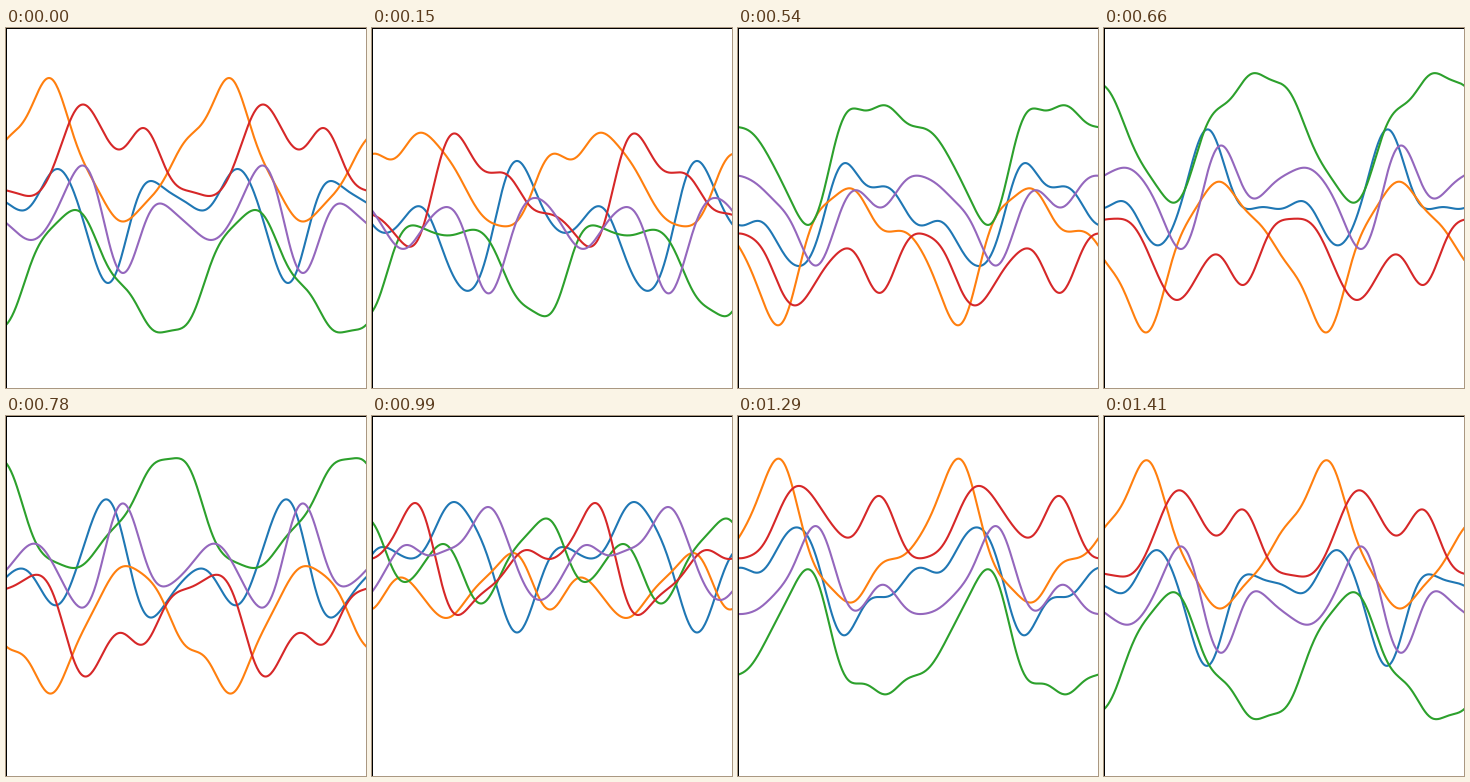
A matplotlib script for the animation above (1440 ms loop, 360 by 360 pixels).

```python
import numpy as np
import matplotlib.pyplot as plt
from matplotlib.animation import FuncAnimation

SIZE = 360
STEPS = 48
INTERVAL = 30
PERIOD = 180
MID = 172.5
ORDER = 8
TURN = 2 * np.pi * 33 / STEPS  # angle between the two key curves of a wave


def basis(x):
    """Fourier basis of one period, damped for smoothness, and its slope."""
    u = 2 * np.pi * np.asarray(x, float)[:, None] / PERIOD
    m = np.arange(1, ORDER + 1)
    damp = np.exp(-(0.62 * m) ** 2 / 4)
    c, s = damp * np.cos(m * u), damp * np.sin(m * u)
    return np.hstack([u ** 0, c, s]), np.hstack([0 * u, -m * s, m * c])


xs = np.linspace(0, SIZE, SIZE + 1)
grid = basis(xs)[0]


def curve(turns, via=()):
    """Smooth periodic curve that is level at the turns and passes the via points."""
    x, y = np.array([*turns, *via], float).T
    values, slopes = basis(x)
    flat = slopes[:len(turns)]
    # Least squares: heights within 0.5, slopes within 4, weights of about 60.
    rows = np.vstack([values / 0.5, flat / 4, np.eye(values.shape[1]) / 60])
    goals = np.zeros(len(rows))
    goals[:len(y)] = (y - MID) / 0.5
    return grid @ np.linalg.lstsq(rows, goals, rcond=None)[0]


# Each wave circles through two key curves.
waves = {
    "tab:blue": (
        curve([(16, 182.5), (51.5, 141), (102, 255), (145, 153)], [(168, 167)]),
        curve([(11, 131), (39, 142.5), (82, 86), (145, 216.5)], [(111, 128)])),
    "tab:orange": (
        curve([(43, 50), (117, 193.5)], [(0, 112), (80, 139), (157, 153)]),
        curve([(29, 161.5), (74, 202), (141, 137), (178, 193.5)], [(107, 168)])),
    "tab:green": (
        curve([(69, 182), (154, 304.5)], [(0, 297), (36, 212), (108, 248)]),
        curve([(33, 166), (71, 128), (109, 187.5), (174, 102.5)], [(145, 130)])),
    "tab:red": (
        curve([(23, 168), (77, 76.5), (113, 121.5), (137, 100)], [(163, 147)]),
        curve([(43, 87), (86, 199), (155, 134), (177, 143)], [(113, 175)])),
    "tab:purple": (
        curve([(25, 212), (76.5, 137.5), (117, 245), (154, 175.5)]),
        curve([(35, 129), (58, 139.5), (116, 91), (168, 184)])),
}

fig = plt.figure(figsize=(SIZE / 100, SIZE / 100), dpi=100)
ax = fig.add_axes([0, 0, 1, 1])
ax.set(xlim=(0, SIZE), ylim=(SIZE, 0), xticks=[], yticks=[])
for spine in ax.spines.values():
    spine.set_linewidth(0.72)  # exactly one pixel
lines = [ax.plot(xs, 0 * xs, color=c, lw=1.5)[0] for c in waves]


def update(step):
    t = 2 * np.pi * step / STEPS
    for line, (start, later) in zip(lines, waves.values()):
        mix = start * np.sin(TURN - t) + later * np.sin(t)
        line.set_ydata(MID + mix / np.sin(TURN))
    return lines


anim = FuncAnimation(fig, update, frames=STEPS, interval=INTERVAL,
                     repeat=True, repeat_delay=0)
plt.show()
```
